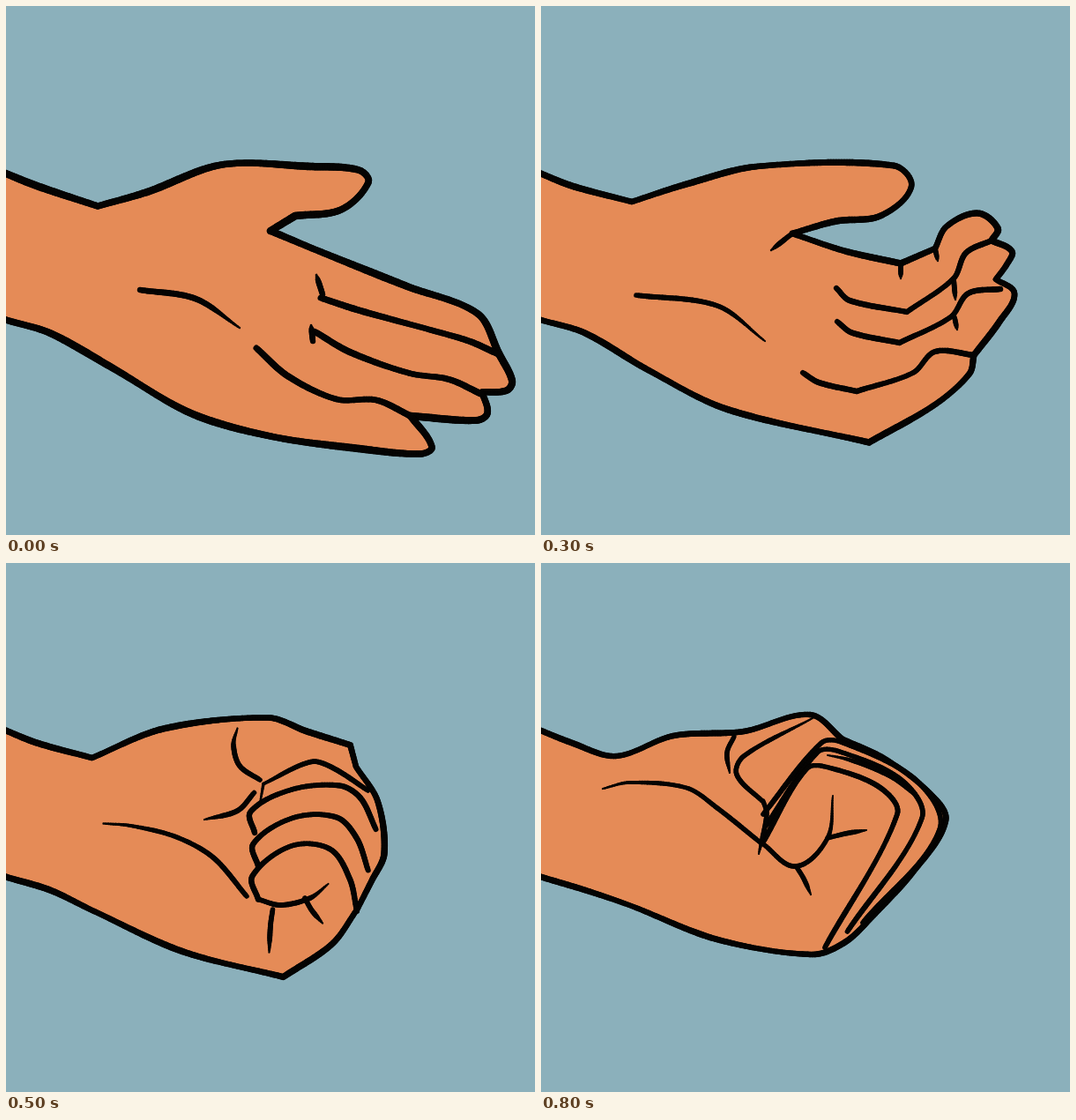
Recreate the animation shown at these times as an HTML page with a canvas. Size 600 px wide and 600 px high, loop 1.8 s.

```html
<!DOCTYPE html>
<html lang="en">
<head>
<meta charset="utf-8">
<title>Closing hand</title>
<style>
html, body { margin: 0; width: 100%; height: 100%; overflow: hidden; background: #8bb0bb; }
canvas { display: block; width: 100vw; height: 100vh; }
</style>
</head>
<body>
<canvas id="stage" width="600" height="600"></canvas>
<script>
const ctx = document.getElementById('stage').getContext('2d');
const BACK = '#8bb0bb', SKIN = '#e58b57', INK = '#050403';
const LOOP = 1800, STEP = 100;

const mix = (a, b, k) => a + (b - a) * k;

// Key points as "x,y"; "!" marks a corner.
const points = text => text.trim().split(/\s+/).map(s => {
  const [x, y] = s.split(',').map(parseFloat);
  return { x, y, corner: s.endsWith('!') };
});

const mixPoints = (a, b, k) => a.map((p, i) => ({
  x: mix(p.x, b[i].x, k), y: mix(p.y, b[i].y, k), corner: p.corner || b[i].corner
}));

// Every hand grows from the same forearm.
const pose = (pen, hand, first, last, bow, details) => ({
  pen, bow,
  body: points(`-5,188 35,204 ${hand} 50,371 0,356 -5,354`),
  first: points(first),
  last: points(last),
  details: details.map(points)
});

const mixPose = (a, b, k) => ({
  pen: mix(a.pen, b.pen, k),
  bow: a.bow.map((v, i) => mix(v, b.bow[i], k)),
  body: mixPoints(a.body, b.body, k),
  first: mixPoints(a.first, b.first, k),
  last: mixPoints(a.last, b.last, k),
  details: a.details.slice(0, b.details.length).map((d, i) => mixPoints(d, b.details[i], k))
});

// Pulls everything near a spot upwards.
function raise(p, x, y, radius, height) {
  const up = q => ({ ...q,
    y: q.y - height * Math.exp(-((q.x - x) ** 2 + (q.y - y) ** 2) / radius ** 2) });
  return { ...p, body: p.body.map(up), details: p.details.map(d => d.map(up)) };
}

const flat = pose(8,
  `104,227! 160,211 245,180 345,182 400,186 411,200 380,231 328,238! 300,255! 355,278
   455,318 535,349 559,394! 574,425 568,436 540,438! 546,462 533,470 459,465! 483,500
   470,508 400,502 300,488 210,462 120,410`,
  '357,331 400,345 480,367 525,380 559,395',
  '284,388 320,420 375,446 420,447 459,465',
  [30, 10],
  ['359,327 352,305', '348,380 346,362', '152,322 215,332 265,365']);

const relaxed = pose(7.5,
  `104,225! 165,206 260,183 405,182 426,207 385,240 335,246 290,260! 345,278 410,297
   462,300 490,294 525,296 549,333 533,341! 568,375 560,397 535,396! 557,420 545,437
   494,439! 507,463 500,481! 375,502 210,456 120,410`,
  '338,321 355,335 414,356! 465,346 500,342 533,341',
  '303,416 320,427 385,447! 430,442 465,437 494,439',
  [18, 3],
  ['290,260 265,277', '113,330 200,338 260,381']);

const curled = pose(7,
  `103,222! 165,202 245,182 400,181 420,205 385,238 335,244 285,258! 345,278 408,292!
   447,275! 460,250 495,235 518,252 511,266! 534,278 529,292 516,310! 537,326 520,358
   491,396! 486,417 447,452 372,495! 210,457 120,412`,
  '335,320 350,334 415,347! 468,309 482,280 511,266',
  '297,416 315,427 358,437! 422,416 447,392 491,396',
  [20, -10],
  ['285,258 261,277', '108,328 200,340 254,380',
   '408,292 408,309', '447,275 450,289', '468,309 470,333', '469,353 472,367']);

// Fist details: index, thumb, web, palm, pinky curl, fold, crease.
const fist = pose(7,
  `105,222! 205,189 300,184 345,201 395,218! 400,250! 428,290 439,362 420,402! 403,425!
   375,460 305,485 200,448 100,397`,
  '428,290 412,283 380,281 303,291 291,302 298,319',
  '403,425 396,385 375,356 302,354 286,372 292,397',
  [4, 2],
  ['405,253 350,255 322,259 308,270 311,286',
   '298,258 270,240 264,212 269,194',
   '297,259 275,274 240,286',
   '268,390 235,348 210,327 165,311 120,297',
   '292,397 320,404 355,402 380,392',
   '345,404 350,425 362,440',
   '305,413 294,435 295,470',
   '330,256 319,245 318,228', '298,259 332,255', '345,406 310,412! 268,390']);

const tight = pose(6.8,
  `90,220! 152,187 295,167 335,180 386,195! 394,212 415,250 419,297 409,320! 394,360!
   365,404 324,454! 200,433 100,393`,
  '411,314 392,250 377,224 345,223 264,262 266,293',
  '393,365 384,332 360,293 345,288 273,338 280,366',
  [0, -2],
  ['416,263 392,210 370,192 276,231! 265,260',
   '278,234 260,220 252,200 256,181',
   '266,262 250,288 210,296',
   '278,366 235,320 175,294 118,285 101,294',
   '280,366 303,372 335,358 351,336',
   '333,356 343,362 356,377',
   '300,373 306,387 302,413']);

const closed = pose(6.5,
  `85,219 150,196 230,191 305,172 342,200! 390,222 440,260 459,292 421,352 375,402
   345,430 308,444 200,427 100,388`,
  '365,408 452,302 425,246 340,203 318,204 252,285',
  '322,436 404,285 385,255 330,233 302,233 251,318',
  [4, -4],
  ['424,262 400,244 370,230 345,222 325,218',
   '252,271 222,240 230,219 308,176',
   '252,270 256,285 247,330',
   '250,318 200,278 165,255 100,249 70,256',
   '251,318 289,344 325,312 331,264',
   '325,312 345,307 369,303',
   '290,345 298,358 306,376',
   '219,197 211,215 214,238']);

const poses = [
  flat, relaxed, mixPose(relaxed, curled, .5), curled,
  fist, mixPose(fist, tight, .5), tight,
  raise(mixPose(tight, closed, .5), 310, 172, 60, 26), closed
];

// Smooth curve through the key points.
function sample(pts) {
  const out = [pts[0]];
  for (let i = 0; i + 1 < pts.length; i++) {
    const a = pts[i], b = pts[i + 1];
    const before = a.corner || !i ? a : pts[i - 1];
    const after = b.corner || i + 2 >= pts.length ? b : pts[i + 2];
    const len = Math.hypot(b.x - a.x, b.y - a.y);
    const slope = (p, q) => {
      const k = len * .95 / (Math.hypot(q.x - p.x, q.y - p.y) || 1);
      return { x: (q.x - p.x) * k, y: (q.y - p.y) * k };
    };
    const s = slope(before, b), e = slope(a, after);
    const n = Math.max(2, Math.ceil(len / 3));
    for (let j = 1; j <= n; j++) {
      const t = j / n, t2 = t * t, t3 = t2 * t;
      const at = k => (2 * t3 - 3 * t2 + 1) * a[k] + (t3 - 2 * t2 + t) * s[k]
        + (3 * t2 - 2 * t3) * b[k] + (t3 - t2) * e[k];
      out.push({ x: at('x'), y: at('y') });
    }
  }
  return out;
}

function ink(pts, width, taper) {
  const path = sample(pts), last = path.length - 1;
  for (let i = 1; i <= last; i++) {
    const thin = taper ? Math.min(1, .4 + (1 - i / last) * 2) : 1;
    ctx.lineWidth = width * thin * (1 + .07 * Math.sin(i / 9));
    ctx.beginPath();
    ctx.moveTo(path[i - 1].x, path[i - 1].y);
    ctx.lineTo(path[i].x, path[i].y);
    ctx.stroke();
  }
}

function draw({ pen, body, first, last, bow, details }) {
  ctx.fillStyle = BACK;
  ctx.fillRect(0, 0, 600, 600);
  ctx.fillStyle = SKIN;
  ctx.beginPath();
  sample(body).forEach(p => ctx.lineTo(p.x, p.y));
  ctx.fill();
  ctx.strokeStyle = INK;
  ctx.lineCap = ctx.lineJoin = 'round';
  ink(body, pen);
  // The line between the outer two fingers bows out from their middle.
  const middle = mixPoints(first, last, .5)
    .map(p => ({ ...p, x: p.x + bow[0], y: p.y + bow[1] }));
  [first, middle, last].forEach(line => ink(line, pen * .87));
  details.forEach(line => ink(line, pen * .8, true));
}

let shown = -1;
const start = performance.now();

function tick() {
  const time = (performance.now() - start) % LOOP;
  const index = Math.min(poses.length - 1, Math.floor(time / STEP));
  if (index !== shown) draw(poses[shown = index]);
  requestAnimationFrame(tick);
}
tick();
</script>
</body>
</html>
```
